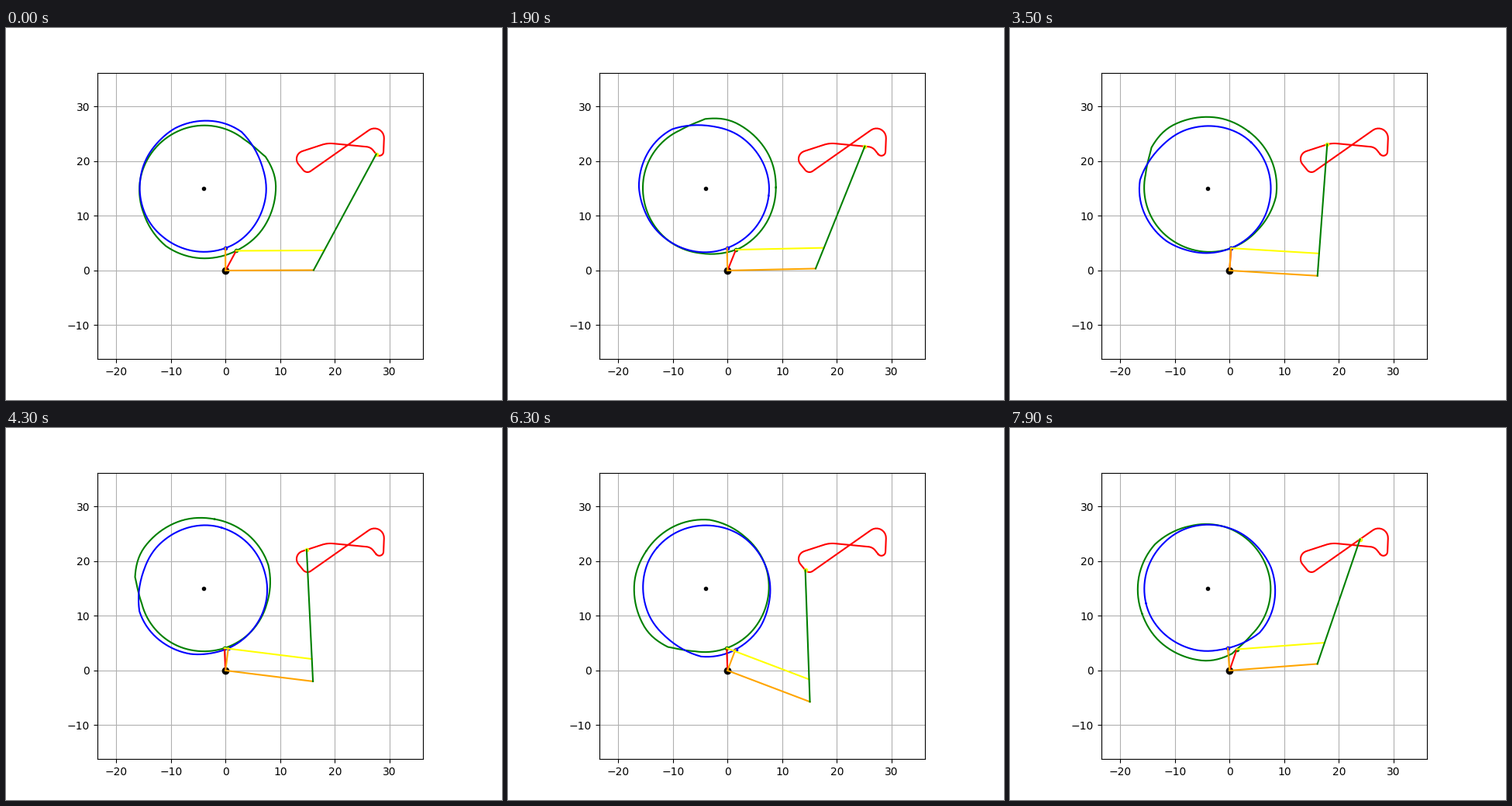
Write a matplotlib script that moves like this. It is 640 px wide and 480 px high and loops after 8 s.

```python
import numpy as np
import matplotlib.pyplot as plt
from matplotlib.animation import FuncAnimation

FRAMES, INTERVAL = 80, 100
STEPS = 9                      # samples per line or arc of the path
CRANK, ROCKER, ARM = 16.12, 24.1, 4.1
CAM = -4 + 15j                 # cam axis

# Rounded corners of the path: centre, radius, turn (+1 left, -1 right)
CORNERS = [
    (28.15 + 21.75j, 0.75, -1),
    (25.63 + 20.90j, 1.75, 1),
    (19.20 + 18.25j, 5.00, 1),
    (14.50 + 20.40j, 1.50, 1),
    (15.00 + 19.00j, 1.00, 1),
    (27.25 + 24.25j, 1.75, -1),
]


def tangent(a, b):
    """Unit normal, right of travel, of the line leaving corner a for b."""
    (c1, r1, s1), (c2, r2, s2) = a, b
    gap = c2 - c1
    q = (s1 * r1 - s2 * r2) / abs(gap)
    return gap / abs(gap) * (q - 1j * np.sqrt(1 - q * q))


def trace():
    """Sample the closed path as complex points."""
    t = np.arange(STEPS) / STEPS
    n = len(CORNERS)
    normals = [tangent(CORNERS[i], CORNERS[(i + 1) % n]) for i in range(n)]
    parts = []
    for i in range(n):
        c1, r1, s1 = CORNERS[i]
        c2, r2, s2 = CORNERS[(i + 1) % n]
        m, m_out = normals[i], normals[(i + 1) % n]
        start, end = c1 + s1 * r1 * m, c2 + s2 * r2 * m
        parts.append(start + (end - start) * t)
        turn = s2 * (s2 * np.angle(m_out / m) % (2 * np.pi))
        parts.append(c2 + s2 * r2 * m * np.exp(1j * turn * t))
    return np.concatenate(parts)


def closed(z):
    return np.append(z, z[0])


path = trace()
count = len(path)
delta = 2 * np.pi / count

# Inverse kinematics of the parallelogram linkage
reach = np.abs(path)
bend = np.arccos((reach**2 + CRANK**2 - ROCKER**2) / (2 * reach * CRANK))
crank = np.exp(1j * (np.angle(path) - bend))
elbow = CRANK * crank
rocker = (path - elbow) / ROCKER
pin_a = ARM * rocker
pin_b = ARM * 1j * crank

# Cam profiles: follower pins seen from the turning cam
unwind = np.exp(-1j * delta * np.arange(count))
cam_a = closed((pin_a - CAM) * unwind)
cam_b = closed((pin_b - CAM) * unwind)

fig, ax = plt.subplots(figsize=(6.4, 4.8), dpi=100)
ax.set_aspect("equal")
ax.set_xlim(-23.43, 36.12)
ax.set_ylim(-16.2, 36.2)
ax.set_xticks(range(-20, 31, 10))
ax.set_yticks(range(-10, 31, 10))
ax.grid(True)


def draw(color, marker="", z=()):
    z = np.asarray(z, dtype=complex)
    style = "None" if marker else "-"
    return ax.plot(z.real, z.imag, color=color, marker=marker, ls=style)[0]


def move(line, *z):
    z = np.asarray(z, dtype=complex).ravel()
    line.set_data(z.real, z.imag)


draw("black", "o", [0])
draw("black", ".", [CAM])
draw("red", z=closed(path))
tip = draw("yellow", ".")
dot_a = draw("green", ".")
dot_b = draw("blue", ".")
green_cam = draw("green")
blue_cam = draw("blue")
arm_a = draw("red")
arm_b = draw("orange")
base = draw("orange")
link = draw("yellow")
bar = draw("green")


def update(frame):
    k = frame % count
    spin = np.exp(1j * delta * k)
    a, b, e, p = pin_a[k], pin_b[k], elbow[k], path[k]
    move(tip, p)
    move(dot_a, a)
    move(dot_b, b)
    move(green_cam, CAM + cam_a * spin)
    move(blue_cam, CAM + cam_b * spin)
    move(arm_a, 0, a)
    move(arm_b, 0, b)
    move(base, 0, e)
    move(link, a, a + e)
    move(bar, e, p)
    return tip, dot_a, dot_b, green_cam, blue_cam, arm_a, arm_b, base, link, bar


anim = FuncAnimation(fig, update, frames=FRAMES, interval=INTERVAL,
                     repeat=True, repeat_delay=0)
plt.show()
```
